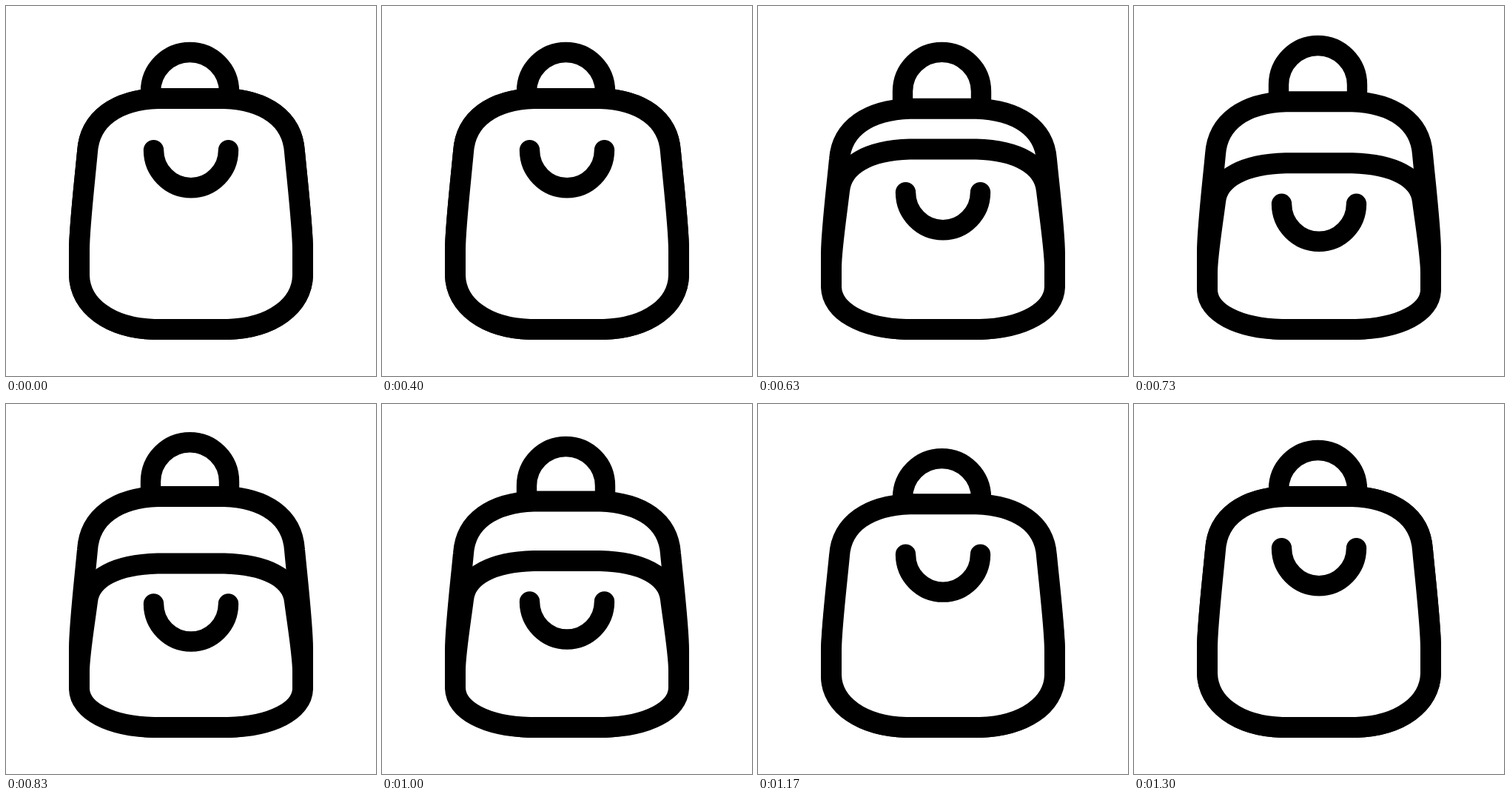
These frames come from a looping animation (500 px wide and 500 px high, 1330 ms). An HTML page:

```html
<!DOCTYPE html>
<html lang="en">
<head>
<meta charset="utf-8">
<title>Backpack</title>
<style>
  html, body { margin: 0; width: 100%; height: 100%; overflow: hidden; background: #fff; }
  svg { display: block; width: 100%; height: 100%; }
  path { fill: none; stroke: #000; stroke-width: 27.4; stroke-linecap: round; }
  #bag, #pocket { fill: #fff; stroke-width: 28; }
  #handle { stroke-linecap: butt; }
</style>
</head>
<body>
<svg viewBox="0 0 500 500">
  <path id="handle"/>
  <path id="bag"/>
  <path id="pocket"/>
  <path id="smile"/>
</svg>
<script>
const LOOP = 1330, STEP = 100 / 3;
const BASE = 437, TOP = 125;

// Cubic bezier easing with control points (x1, 0) and (x2, 1)
function ease(x1, x2) {
  return x => {
    let lo = 0, hi = 1;
    for (let i = 0; i < 24; i++) {
      const s = (lo + hi) / 2, r = 1 - s;
      if (3 * x1 * s * r * r + 3 * x2 * s * s * r + s ** 3 < x) lo = s; else hi = s;
    }
    return lo * lo * (3 - 2 * lo);
  };
}
const sharp = ease(0.7, 0.2), soft = ease(0.667, 0.333), quick = ease(0.35, 0.25);

// Keys are [step, value, easing towards this key]
const tracks = {
  pocket: [[11.7, 125], [25, 215.5, sharp], [27.7, 215.5, soft], [39, 125, sharp]],
  smile: [[11.7, 194.7], [25, 270, sharp], [27.7, 270, soft], [39, 194.7, sharp]],
  bag: [[12, 125], [18, 139, soft], [25, 125, soft], [28, 125, soft], [33, 151.5, soft], [39, 125, soft]],
  handle: [[12, 115.5], [16, 124.5, soft], [25, 104.7, quick], [28, 104.7, soft], [33, 128.5, soft], [39, 115.5, soft]]
};

function valueAt(keys, n) {
  const i = keys.findIndex(k => k[0] > n);
  if (i === 0) return keys[0][1];
  if (i < 0) return keys[keys.length - 1][1];
  const [a, from] = keys[i - 1], [b, to, curve] = keys[i];
  return from + (to - from) * curve((n - a) / (b - a));
}

// Left half of the body, from the top edge down to the base
const half = [
  [205, 125], [150, 127], [113, 152], [110, 197],
  [106, 240], [99, 300], [99, 330],
  [99, 341], [99, 353], [99, 364],
  [100, 405], [140, 435], [200, 437]
];

function body(top) {
  const k = (BASE - top) / (BASE - TOP);
  const left = half.map(([x, y]) => [x, BASE - (BASE - y) * k]);
  const right = left.map(([x, y]) => [500 - x, y]).reverse();
  const line = pts => pts[0] + "C" + pts.slice(1).join(" ");
  return "M" + line(left) + "L" + line(right) + "Z";
}

const draw = (id, d) => document.getElementById(id).setAttribute("d", d);

function render(t) {
  const n = Math.floor((t % LOOP + 3.4) / STEP);
  const at = name => valueAt(tracks[name], n);
  const bag = at("bag"), handle = at("handle"), smile = at("smile");
  draw("handle", `M195.5 ${bag}V${handle}a53 53 0 0 1 106 0V${bag}`);
  draw("bag", body(bag));
  draw("pocket", body(at("pocket")));
  draw("smile", `M199.5 ${smile}a50.5 51 0 0 0 101 0`);
}

const start = performance.now();
function tick() {
  render(performance.now() - start);
  requestAnimationFrame(tick);
}
tick();
</script>
</body>
</html>
```
